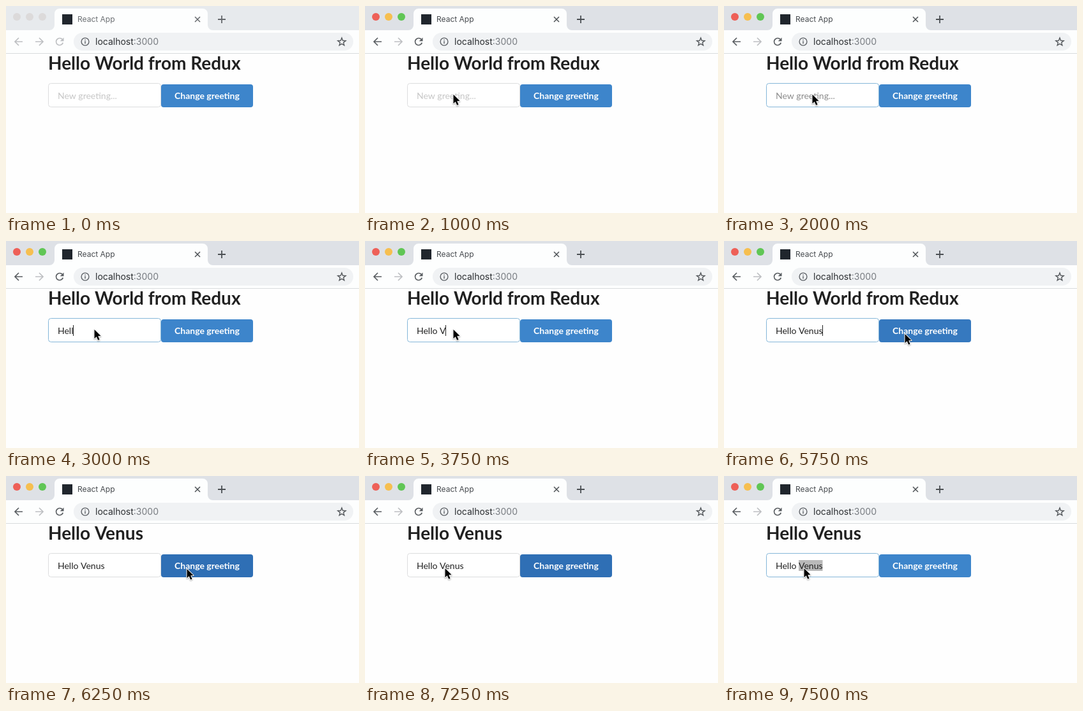
Animation, 553 px wide and 325 px high, one loop 8000 ms. Source, as an HTML page with a canvas:

```html
<!DOCTYPE html>
<html lang="en">
<head>
<meta charset="utf-8">
<title>Greeting form</title>
<style>
html, body { margin: 0; width: 100%; height: 100%; overflow: hidden; background: #fefefe; }
canvas { display: block; width: 553px; height: 325px; }
</style>
</head>
<body>
<canvas id="stage"></canvas>
<script>
const W = 553, H = 325, LOOP = 8000, STEP = 250;
const canvas = document.getElementById('stage');
const ctx = canvas.getContext('2d');
const ratio = window.devicePixelRatio || 1;
canvas.width = Math.round(W * ratio);
canvas.height = Math.round(H * ratio);
ctx.scale(ratio, ratio);

const LATO = 'Lato, sans-serif';
const UI = 'Inter, Roboto, sans-serif';
const BODY_FONT = '14px ' + LATO;

// Each track lists [start time, value]; a value holds until the next entry.
const typed = [[0, ''], [2500, 'H'], [2750, 'Hel'], [3000, 'Hell'], [3250, 'Hello'], [3500, 'Hello '],
  [3750, 'Hello V'], [4000, 'Hello Ve'], [4250, 'Hello Ven'], [4500, 'Hello Venu'], [4750, 'Hello Venus']];
const pointer = [[0, null], [250, [186, 14]], [500, [166, 76]], [750, [144, 126]], [1000, [138, 139]],
  [5000, [152, 146]], [5250, [212, 149]], [5500, [268, 148]], [5750, [283, 146]],
  [6750, [252, 155]], [7000, [164, 157]], [7250, [125, 145]]];
const buttonColor = [[0, '#3d85cb'], [5500, '#3679bf'], [6000, '#2f68a5'],
  [6250, '#2f6fb5'], [7500, '#3d85cb']];
const focused = [[0, false], [1500, true], [6000, false], [7500, true]];
const caretOn = [[0, false], [1500, true], [2000, false], [2500, true], [5250, false],
  [5750, true], [6000, false]];

function at(track, time) {
  let value = track[0][1];
  for (const [start, next] of track) if (time >= start) value = next;
  return value;
}

function text(str, x, y, font, color) {
  ctx.font = font;
  ctx.fillStyle = color;
  ctx.fillText(str, x, y);
}

function rounded(x, y, w, h, r, fill, stroke) {
  ctx.beginPath();
  ctx.roundRect(x, y, w, h, r);
  ctx.fillStyle = fill;
  ctx.fill();
  if (stroke) {
    ctx.strokeStyle = stroke;
    ctx.lineWidth = 1;
    ctx.stroke();
  }
}

function disc(x, y, r, color) {
  ctx.beginPath();
  ctx.arc(x, y, r, 0, Math.PI * 2);
  ctx.fillStyle = color;
  ctx.fill();
}

function strokeLines(color, width, ...lines) {
  ctx.strokeStyle = color;
  ctx.lineWidth = width;
  ctx.beginPath();
  for (const line of lines) {
    line.forEach(([x, y], i) => i ? ctx.lineTo(x, y) : ctx.moveTo(x, y));
  }
  ctx.stroke();
}

function polygon(points) {
  ctx.beginPath();
  points.forEach(([x, y], i) => i ? ctx.lineTo(x, y) : ctx.moveTo(x, y));
  ctx.closePath();
}

function arrow(x, y, dir, color) {
  strokeLines(color, 1.7,
    [[x - 6 * dir, y], [x + 6 * dir, y]],
    [[x, y - 6], [x + 6 * dir, y], [x, y + 6]]);
}

function drawTabs(active) {
  ctx.fillStyle = active ? '#dee1e6' : '#e7eaed';
  ctx.fillRect(0, 0, W, 38);

  const lights = active ? ['#ee6058', '#f6bf50', '#60c655'] : ['#dcdada', '#dcdada', '#dcdada'];
  lights.forEach((color, i) => disc(17 + i * 20, 17, 6, color));

  ctx.beginPath();
  ctx.moveTo(68, 38);
  ctx.arcTo(76, 38, 76, 30, 8);
  ctx.arcTo(76, 4, 84, 4, 8);
  ctx.arcTo(316, 4, 316, 12, 8);
  ctx.lineTo(316, 30);
  ctx.arcTo(316, 38, 324, 38, 8);
  ctx.closePath();
  ctx.fillStyle = '#fdfefe';
  ctx.fill();

  ctx.fillStyle = '#20262d';
  ctx.fillRect(88, 13, 16, 16);
  text('React App', 112, 25, '12px ' + UI, active ? '#45494d' : '#6b6f73');

  const ink = active ? '#4c5054' : '#66696d';
  strokeLines(ink, 1.5, [[296, 17], [304, 25]], [[304, 17], [296, 25]]);
  strokeLines(ink, 1.8, [[332, 21], [344, 21]], [[338, 15], [338, 27]]);
}

function drawReload(color) {
  ctx.strokeStyle = color;
  ctx.lineWidth = 1.7;
  ctx.beginPath();
  ctx.arc(84, 56, 5.5, 0.3, Math.PI * 1.75);
  ctx.stroke();
  polygon([[90.5, 49.5], [90.5, 55.3], [84.7, 55.3]]);
  ctx.fillStyle = color;
  ctx.fill();
}

function drawStar(x, y, color) {
  polygon(Array.from({ length: 10 }, (_, i) => {
    const r = i % 2 ? 2.8 : 6.5, a = -Math.PI / 2 + i * Math.PI / 5;
    return [x + r * Math.cos(a), y + 0.5 + r * Math.sin(a)];
  }));
  ctx.strokeStyle = color;
  ctx.lineWidth = 1.4;
  ctx.stroke();
}

function drawToolbar(active) {
  ctx.fillStyle = '#fdfefe';
  ctx.fillRect(0, 38, W, 36);
  ctx.fillStyle = '#d9dbdd';
  ctx.fillRect(0, 74, W, 1);

  arrow(20, 56, -1, active ? '#5a5e62' : '#bdbfc2');
  arrow(52, 56, 1, '#bdbfc2');
  drawReload(active ? '#5a5e62' : '#bdbfc2');

  rounded(106, 42, 438, 28, 14, '#f0f2f4');
  ctx.strokeStyle = '#5f6368';
  ctx.lineWidth = 1.4;
  ctx.beginPath();
  ctx.arc(124, 56, 5.9, 0, Math.PI * 2);
  ctx.stroke();
  ctx.fillStyle = '#5f6368';
  ctx.fillRect(123.3, 55, 1.4, 4.2);
  ctx.fillRect(123.3, 52.6, 1.4, 1.4);

  const host = 'localhost', urlFont = '14px ' + UI;
  text(host, 140, 61, urlFont, '#2b2e31');
  text(':3000', 140 + ctx.measureText(host).width, 61, urlFont, '#777b80');
  drawStar(526, 56, '#55595d');
}

function drawPage(time) {
  const hasFocus = at(focused, time);
  const value = at(typed, time);
  const ink = '#212121';

  text(time < 6000 ? 'Hello World from Redux' : 'Hello Venus', 66, 100, 'bold 28px ' + LATO, ink);

  rounded(66.5, 121.5, 176, 37, 4, '#fff', hasFocus ? '#85b7d9' : '#dcddde');
  rounded(243, 123, 144, 36, 4, at(buttonColor, time));
  text('Change greeting', 264, 146, 'bold 14px ' + LATO, '#fff');

  ctx.font = BODY_FONT;
  if (time >= 7500) {
    const start = 81 + ctx.measureText('Hello ').width;
    ctx.fillStyle = '#b9b9b9';
    ctx.fillRect(start, 132, ctx.measureText('Venus').width, 17);
  }
  if (value) text(value, 81, 146, BODY_FONT, ink);
  else text('New greeting...', 81, 146, BODY_FONT, hasFocus ? '#8c8c8c' : '#c6c6c6');

  if (at(caretOn, time)) {
    ctx.fillStyle = '#222';
    ctx.fillRect(Math.round(81 + ctx.measureText(value).width), 132, 1, 17);
  }
}

function drawPointer([x, y]) {
  ctx.save();
  ctx.translate(x, y);
  polygon([[0.5, 0], [0.5, 14.2], [3.7, 11.2], [6.2, 16.8], [8.6, 15.8], [6.2, 10.3], [10.6, 10.1]]);
  ctx.lineJoin = 'round';
  ctx.shadowColor = 'rgba(0,0,0,0.35)';
  ctx.shadowBlur = 2 * ratio;
  ctx.shadowOffsetY = ratio;
  ctx.strokeStyle = '#fff';
  ctx.lineWidth = 2;
  ctx.stroke();
  ctx.shadowColor = 'transparent';
  ctx.fillStyle = '#000';
  ctx.fill();
  ctx.restore();
}

function draw(now) {
  const time = Math.floor((now % LOOP) / STEP) * STEP;
  const active = time >= 250;
  ctx.fillStyle = '#fefefe';
  ctx.fillRect(0, 0, W, H);
  drawTabs(active);
  drawToolbar(active);
  drawPage(time);
  const position = at(pointer, time);
  if (position) drawPointer(position);
}

let origin = null;
function tick(now) {
  if (origin === null) origin = now;
  draw(now - origin);
  requestAnimationFrame(tick);
}
draw(0);
requestAnimationFrame(tick);
</script>
</body>
</html>
```
